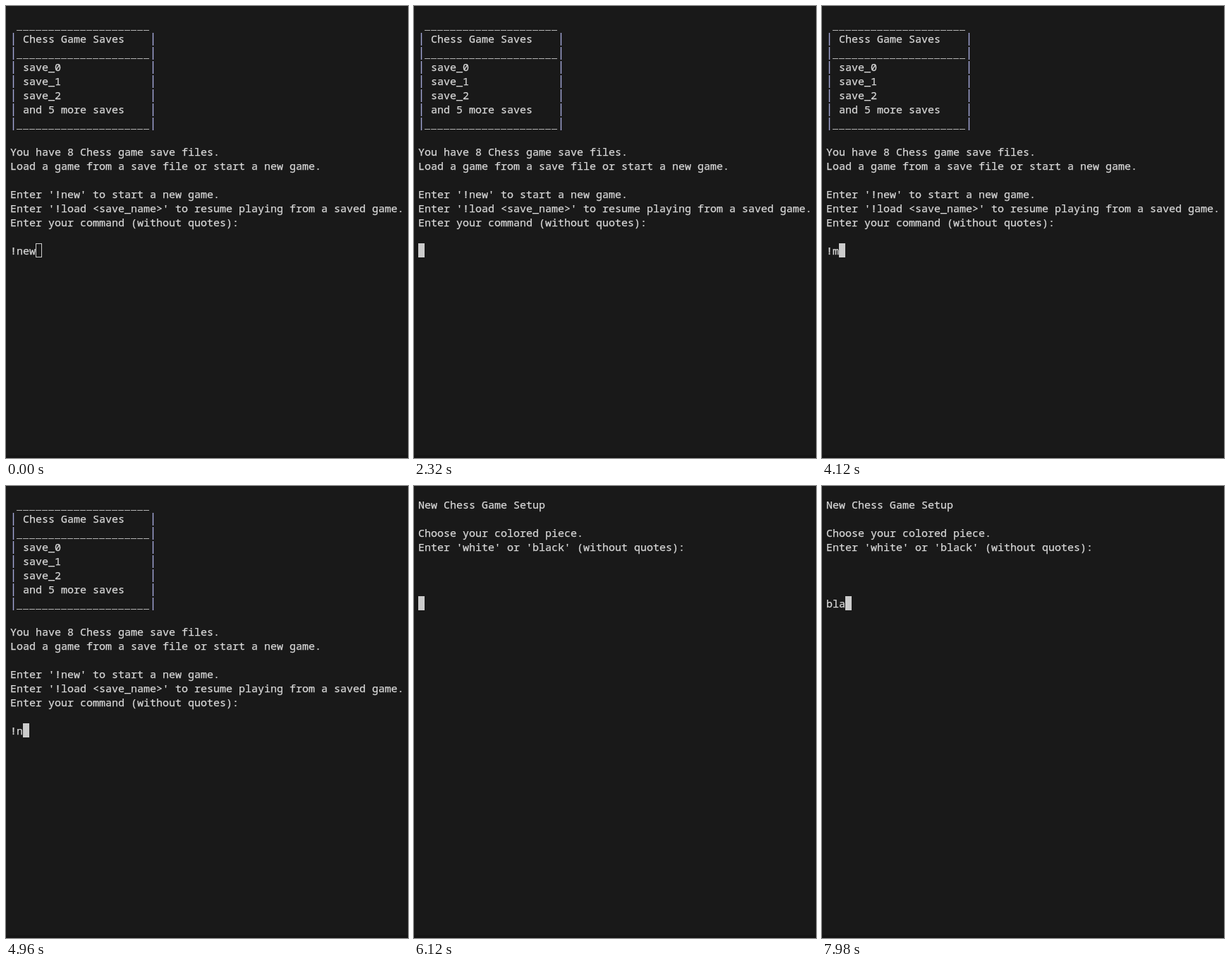
Write an HTML page that moves like this. It is 570 px wide and 640 px high and loops after 8 s.

```html
<!DOCTYPE html>
<html lang="en">
<head>
<meta charset="utf-8">
<title>Chess terminal</title>
<style>
  html, body { margin: 0; width: 100%; height: 100%; overflow: hidden; background: #191919; }
  svg { display: block; width: 570px; height: 640px; }
  text {
    font: 15px "Noto Sans Mono", "DejaVu Sans Mono", monospace;
    fill: #d8d8d8; stroke: #d8d8d8; stroke-width: 0.25px; white-space: pre;
  }
  .bar { stroke: #a4a8d8; stroke-width: 1.4px; }
  .rule { stroke: #b4b4b4; stroke-dasharray: 8 1; }
</style>
</head>
<body>
<svg viewBox="0 0 570 640">
  <rect width="570" height="640" fill="#191919"/>
  <rect y="636" width="570" height="4" fill="#151515"/>
  <g id="screen"></g>
  <text id="input" x="6"></text>
  <rect id="cursor" stroke="#cccccc" width="8" height="19"/>
</svg>
<script>
const LOOP = 8000, LEFT = 6, TOP = 16, CELL = 9, ROW = 20, BASELINE = 16;

const menu = {
  inputRow: 16,
  box: { columns: 21, rows: 7, rules: [0, 2, 7] },
  lines: [
    "",
    "  Chess Game Saves",
    "",
    "  save_0",
    "  save_1",
    "  save_2",
    "  and 5 more saves",
    "",
    "",
    "You have 8 Chess game save files.",
    "Load a game from a save file or start a new game.",
    "",
    "Enter '!new' to start a new game.",
    "Enter '!load <save_name>' to resume playing from a saved game.",
    "Enter your command (without quotes):"
  ]
};
const setup = {
  inputRow: 7,
  lines: [
    "New Chess Game Setup",
    "",
    "Choose your colored piece.",
    "Enter 'white' or 'black' (without quotes):"
  ]
};

// Start time in ms, screen, typed text
const steps = [
  [0, menu, "!new"],
  [1870, menu, "!ne"], [2050, menu, "!n"], [2230, menu, "!"], [2320, menu, ""],
  [3520, menu, "!"], [4120, menu, "!m"], [4680, menu, "!"],
  [4960, menu, "!n"], [5050, menu, "!ne"], [5140, menu, "!new"],
  [6120, setup, ""],
  [7810, setup, "b"], [7900, setup, "bl"], [7980, setup, "bla"]
];
const FOCUS_TIME = 940;

const byId = id => document.getElementById(id);
const screenGroup = byId("screen"), input = byId("input"), cursor = byId("cursor");
const rowTop = row => TOP + row * ROW;
const columnLeft = column => LEFT + column * CELL;

function add(parent, tag, attributes = {}) {
  const node = document.createElementNS("http://www.w3.org/2000/svg", tag);
  for (const key in attributes) node.setAttribute(key, attributes[key]);
  return parent.appendChild(node);
}

function drawBox(group, { columns, rows, rules }) {
  for (const row of rules) {
    const y = rowTop(row) + 18.5;
    add(group, "path", { class: "rule", d: `M${columnLeft(1)} ${y}h${columns * CELL}` });
  }
  for (const column of [0, columns + 1]) {
    const x = columnLeft(column) + CELL / 2;
    for (let row = 1; row <= rows; row++) {
      add(group, "path", { class: "bar", d: `M${x} ${rowTop(row) + 2}v18` });
    }
  }
}

function buildScreen(screen) {
  screen.group = add(screenGroup, "g");
  if (screen.box) drawBox(screen.group, screen.box);
  screen.lines.forEach((line, row) => {
    add(screen.group, "text", { x: LEFT, y: rowTop(row) + BASELINE }).textContent = line;
  });
}

function render(time) {
  const [, screen, typed] = steps.findLast(([start]) => start <= time);
  const y = rowTop(screen.inputRow);
  for (const s of [menu, setup]) s.group.setAttribute("display", s === screen ? "inline" : "none");
  input.textContent = typed;
  input.setAttribute("y", y + BASELINE);
  cursor.setAttribute("x", columnLeft(typed.length) + 0.5);
  cursor.setAttribute("y", y + 0.5);
  cursor.setAttribute("fill", time < FOCUS_TIME ? "none" : "#cccccc");
}

[menu, setup].forEach(buildScreen);
const begin = performance.now();
function tick() {
  render((performance.now() - begin) % LOOP);
  requestAnimationFrame(tick);
}
tick();
</script>
</body>
</html>
```
